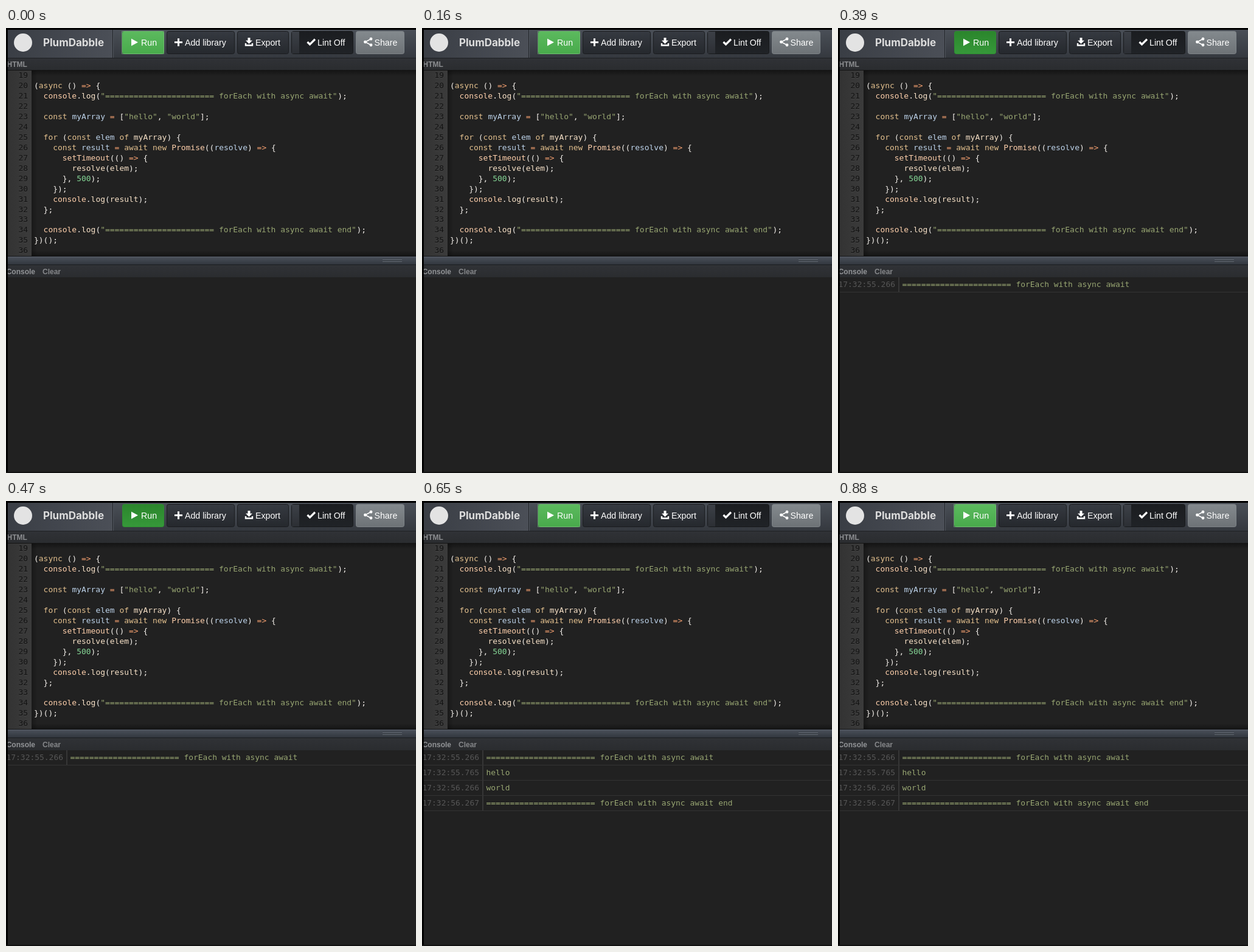
An HTML page with a canvas for the animation above (1040 ms loop, 674 by 732 pixels).

```html
<!DOCTYPE html>
<html lang="en">
<head>
<meta charset="utf-8">
<title>Async playground</title>
<style>
html, body { margin: 0; width: 100%; height: 100%; overflow: hidden; background: #000; }
canvas { display: block; }
</style>
</head>
<body>
<canvas id="stage" width="674" height="732"></canvas>
<script>
const W = 674, H = 732, LOOP = 1040;
const ctx = document.getElementById('stage').getContext('2d');
const MONO = '12.95px "DejaVu Sans Mono", monospace';
const UI = '14.2px "Liberation Sans", Arial, sans-serif';
const LABEL = 'bold 12px "Liberation Sans", Arial, sans-serif';
const CHAR = 7.8;
const BAR = '='.repeat(23);

const CODE = `
(async () => {
  console.log("${BAR} forEach with async await");

  const myArray = ["hello", "world"];

  for (const elem of myArray) {
    const result = await new Promise((resolve) => {
      setTimeout(() => {
        resolve(elem);
      }, 500);
    });
    console.log(result);
  };

  console.log("${BAR} forEach with async await end");
})();
`.split('\n');

const LOG = [
  ['17:32:55.266', BAR + ' forEach with async await'],
  ['17:32:55.765', 'hello'],
  ['17:32:56.266', 'world'],
  ['17:32:56.267', BAR + ' forEach with async await end']
];

function fill(x, y, w, h, color) {
  ctx.fillStyle = color;
  ctx.fillRect(x, y, w, h);
}

function text(str, x, y, font, color) {
  ctx.font = font;
  ctx.fillStyle = color;
  ctx.fillText(str, x, y);
}

function fade(y0, y1, from, to) {
  const g = ctx.createLinearGradient(0, y0, 0, y1);
  g.addColorStop(0, from);
  g.addColorStop(1, to);
  return g;
}

function sideFade(x0, x1, from, to) {
  const g = ctx.createLinearGradient(x0, 0, x1, 0);
  g.addColorStop(0, from);
  g.addColorStop(1, to);
  return g;
}

function button(x, w, top, bottom, border) {
  ctx.beginPath();
  ctx.roundRect(x + 0.5, 5.5, w - 1, 37, 3);
  ctx.fillStyle = fade(5, 43, top, bottom);
  ctx.fill();
  ctx.strokeStyle = border;
  ctx.lineWidth = 1;
  ctx.stroke();
}

function line(points, width) {
  ctx.beginPath();
  points.forEach(([x, y]) => ctx.lineTo(x, y));
  ctx.strokeStyle = '#fff';
  ctx.lineWidth = width;
  ctx.stroke();
}

function shape(points) {
  ctx.beginPath();
  points.forEach(([x, y]) => ctx.lineTo(x, y));
  ctx.fillStyle = '#fff';
  ctx.fill();
}

function dot(x, y, r, color) {
  ctx.beginPath();
  ctx.arc(x, y, r, 0, Math.PI * 2);
  ctx.fillStyle = color;
  ctx.fill();
}

function tokenColor(token, prev, next) {
  if (token[0] === '"') return '#98a672';
  if (/^\d/.test(token)) return '#86d897';
  if (/^=/.test(token)) return '#f5a070';
  if (/^(const|for|of|new|await|async)$/.test(token)) return '#e3c08e';
  if (prev === 'const' || (token === 'resolve' && next === ')')) return '#bdd3ea';
  if (/^(console|Promise|setTimeout)$/.test(token)) return '#ffd0ac';
  return /^\w/.test(token) ? '#f8e2c8' : '#f3efea';
}

function codeLine(str, y) {
  const parts = [...str.matchAll(/"[^"]*"|\w+|=>|[^\s]/g)];
  parts.forEach((m, i) => {
    const color = tokenColor(m[0], parts[i - 1]?.[0], parts[i + 1]?.[0]);
    text(m[0], 46 + m.index * CHAR, y, MONO, color);
  });
}

function drawRun(pressed) {
  if (pressed) button(191, 69, '#2b862c', '#36993a', '#2f8f32');
  else button(191, 69, '#5cba5e', '#48aa4b', '#50b053');
  if (!pressed) {
    ctx.setLineDash([1, 1]);
    ctx.strokeStyle = '#8fc88f';
    ctx.strokeRect(190.5, 5.5, 69, 37);
    ctx.setLineDash([]);
  }
  shape([[206, 17.5], [217, 23.5], [206, 29.5]]);
  text('Run', 222, 29, UI, '#fff');
}

function drawToolbar(pressed) {
  fill(0, 3, W, 47, fade(3, 50, '#4a4f57', '#34383e'));
  fill(3, 3, 172, 47, sideFade(3, 175, '#3a3e45', '#4b4f57'));
  fill(175, 3, 1, 47, '#1f2226');
  fill(176, 3, 1, 47, '#555a62');
  fill(0, 49, W, 1, '#1e2023');

  dot(28, 24, 15, '#e3e3e3');
  text('PlumDabble', 61, 30, 'bold 17px Inter, sans-serif', '#dedede');

  drawRun(pressed);

  button(264, 112, '#363a41', '#25282d', '#1a1c1f');
  line([[277, 23.5], [290, 23.5]], 3);
  line([[283.5, 17], [283.5, 30]], 3);
  text('Add library', 294, 29, UI, '#fff');

  button(380, 85, '#363a41', '#25282d', '#1a1c1f');
  line([[399.5, 16], [399.5, 22]], 4);
  shape([[394, 20.5], [405, 20.5], [399.5, 26]]);
  line([[394, 25], [394, 28.5], [405, 28.5], [405, 25]], 2.4);
  text('Export', 410, 29, UI, '#fff');

  button(469, 102, '#1b1d20', '#202327', '#17191b');
  fill(470, 6, 12, 36, fade(6, 42, '#3c4047', '#2c2f34'));
  line([[495.5, 23], [499.5, 27], [508, 18.5]], 3.2);
  text('Lint Off', 512, 29, UI, '#fff');

  button(575, 80, '#848a8e', '#6d7276', '#7d8387');
  const nodes = [[600, 18], [590.5, 23], [600, 28]];
  line(nodes, 1.6);
  nodes.forEach(([x, y]) => dot(x, y, 2.4, '#fff'));
  text('Share', 605.5, 29, UI, '#fff');
}

function drawEditor() {
  fill(0, 50, W, 20, fade(50, 70, '#303236', '#2a2c2f'));
  text('HTML', 1.5, 64, LABEL, '#8b8d90');

  fill(0, 69, W, 307, '#212121');
  fill(0, 69, W, 10, fade(69, 79, 'rgba(0,0,0,.4)', 'rgba(0,0,0,0)'));
  fill(0, 366, W, 10, fade(366, 376, 'rgba(0,0,0,0)', 'rgba(0,0,0,.4)'));
  fill(42, 70, 10, 306, sideFade(42, 52, 'rgba(0,0,0,.25)', 'rgba(0,0,0,0)'));
  fill(3, 70, 39, 306, sideFade(3, 42, '#333', '#3b3b3b'));

  CODE.forEach((str, i) => {
    const y = 82.3 + i * 16.94;
    text(String(19 + i), 20.5, y + 1, MONO, '#464646');
    text(String(19 + i), 20.5, y, MONO, '#121212');
    codeLine(str, y);
  });

  fill(0, 376, W, 14, fade(376, 390, '#4b515b', '#30353c'));
  fill(0, 375, W, 1, '#131416');
  fill(0, 376, W, 1, '#5a606a');
  fill(0, 389, W, 1, '#1b1d20');
  for (const y of [381, 384]) {
    fill(619, y, 32, 1, '#6a7079');
    fill(619, y + 1, 32, 1, '#2f343a');
  }
}

function drawConsole(rows) {
  fill(0, 390, W, 21, fade(390, 411, '#303236', '#2a2c2f'));
  text('Console', 0.7, 405, LABEL, '#929497');
  text('Clear', 60, 405, LABEL, '#85878a');
  fill(0, 410, W, 322, '#212121');
  LOG.slice(0, rows).forEach(([time, msg], i) => {
    const y = 410 + i * 25;
    text(time, 0.5, y + 16.3, MONO, '#565656');
    fill(99, y, 2, 24, '#363636');
    text(msg, 105.5, y + 16.3, MONO, '#98a672');
    fill(0, y + 24, W, 1, '#333');
  });
}

function draw(now) {
  const t = now % LOOP;
  const pressed = t >= 260 && t < 650;
  const rows = t < 390 ? 0 : t < 520 ? 1 : LOG.length;
  drawToolbar(pressed);
  drawEditor();
  drawConsole(rows);
  fill(0, 0, W, 3, '#000');
  fill(0, 0, 3, H, '#000');
  fill(0, 730, W, 2, '#121212');
}

const start = performance.now();
function tick() {
  draw(performance.now() - start);
  requestAnimationFrame(tick);
}
tick();
</script>
</body>
</html>
```
